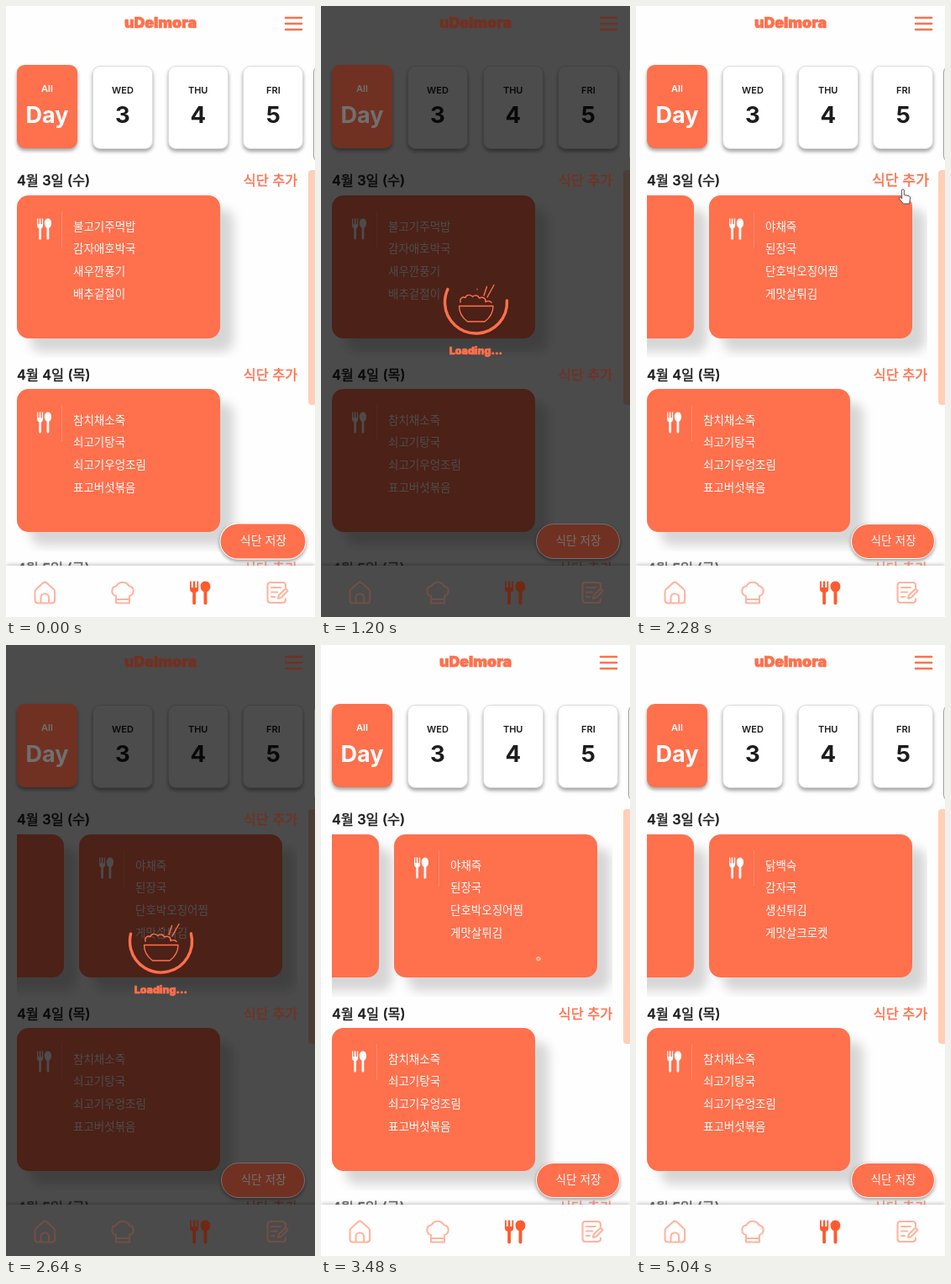
An HTML page that plays this animation: 368x726 px, repeating every 5160 ms.

```html
<!DOCTYPE html>
<html lang="ko">
<head>
<meta charset="utf-8">
<title>식단</title>
<style>
html, body { margin: 0; width: 100%; height: 100%; overflow: hidden; background: #fff; }
#stage { position: relative; width: 368px; height: 726px; overflow: hidden; background: #fefefe;
  font-family: Inter, "Noto Sans CJK KR", "Noto Sans CJK", sans-serif; color: #1c1c1c; }
#stage div, #stage svg { position: absolute; box-sizing: border-box; }
#stage svg { left: 0; top: 0; overflow: visible; }
.txt { white-space: pre; line-height: 1; transform: translateY(-50%); }
.mid { transform: translate(-50%, -50%); }
.hot { z-index: 6; }
.medium { -webkit-text-stroke: .4px; }
.heavy { -webkit-text-stroke: .7px; }
.day { width: 72px; height: 99px; border-radius: 9px; background: #fff; border: 1px solid #dcdcdc;
  box-shadow: 0 3px 4px rgba(0,0,0,.36); }
.day.on { background: #ff704d; border: 0; color: #fff; }
.row { left: 13px; width: 334px; height: 193px; overflow: hidden; }
.card { top: 0; width: 242px; height: 170px; border-radius: 14px; background: #ff704d; color: #fff;
  box-shadow: 16px 16px 13px rgba(0,0,0,.16); }
.rule { left: 52.5px; top: 19px; width: 1.5px; height: 43px; background: #ff8e70; }
.add { color: #ff704d; }
#bar { left: 360px; top: 195px; width: 12px; height: 279px; border-radius: 4px; background: #ffcfb8; }
#nav { left: 0; top: 665px; width: 368px; height: 61px; background: #fefefe; z-index: 3;
  box-shadow: 0 -1px 5px rgba(0,0,0,.25); }
#save { left: 256px; top: 615px; width: 100px; height: 42px; border-radius: 21px; background: #ff704d;
  border: 1px solid #fff; box-shadow: 0 2px 4px rgba(0,0,0,.4); color: #fff; }
#dark { inset: 0; background: #000; z-index: 5; }
#loader { inset: 0; z-index: 8; }
#cursors { z-index: 7; }
</style>
</head>
<body>
<div id="stage"></div>
<script>
const LOOP = 5160, ORANGE = '#ff704d', PALE = '#ffb49e';
const stage = document.getElementById('stage');

function box(parent, cls, style = {}, id = '') {
  const el = document.createElement('div');
  el.className = cls;
  if (id) el.id = id;
  Object.assign(el.style, style);
  return parent.appendChild(el);
}

function text(parent, str, x, y, size, weight = 400, cls = '') {
  const el = box(parent, 'txt ' + cls, { left: x + 'px', top: y + 'px', fontSize: size + 'px', fontWeight: weight });
  el.textContent = str;
  return el;
}

function svg(parent, markup, cls = '', id = '') {
  parent.insertAdjacentHTML('beforeend',
    `<svg class="${cls}" id="${id}" width="368" height="726" fill="none" stroke-linecap="round" stroke-linejoin="round">${markup}</svg>`);
  return parent.lastElementChild;
}

const cutlery = (x, y, sx, sy, fill) => `<path transform="translate(${x} ${y}) scale(${sx} ${sy})" fill="${fill}"
  d="M0 0h1.3v7h1.5v-7h1.7v7h1.5v-7h1.3v8.5q0 3.2-2.3 3.8v12q0 1.5-1.35 1.5t-1.35-1.5v-12q-2.3-.6-2.3-3.8z
  M13.2 0c2.7 0 4.2 2.8 4.2 5.7 0 3-1.2 5-2.8 5.8v12.8q0 1.5-1.4 1.5t-1.4-1.5v-12.8c-1.6-.8-2.8-2.8-2.8-5.8 0-2.9 1.5-5.7 4.2-5.7z"/>`;

function card(row, i, meals) {
  const el = box(row, 'card', { left: i * 260 + 'px' });
  svg(el, cutlery(24, 27.5, .98, .98, '#fff'));
  box(el, 'rule');
  meals.split(' ').forEach((m, k) => text(el, m, 67, 37.5 + k * 26.9, 13.5));
  return el;
}

// header
text(stage, 'uDelmora', 184, 19.5, 17.8, 900, 'mid hot add heavy');
svg(stage, `<path d="M333 14h19M333 21h19M333 28h19" stroke="${ORANGE}" stroke-width="2.6"/>`, 'hot');

// day picker
const all = box(stage, 'day on hot', { left: '13px', top: '70px' });
text(all, 'All', 36, 28, 11, 600, 'mid');
text(all, 'Day', 36, 58.5, 27, 700, 'mid');
['WED 3', 'THU 4', 'FRI 5'].forEach((d, i) => {
  const el = box(stage, 'day', { left: 103 + i * 89.7 + 'px', top: '71px' });
  const [name, num] = d.split(' ');
  text(el, name, 35, 28, 11, 600, 'mid');
  text(el, num, 35, 58, 27.5, 700, 'mid');
});
box(stage, 'day hot', { left: '365.5px', top: '70px', height: '117px', borderColor: '#999', boxShadow: 'none' });
box(stage, '', {}, 'bar');

// meal rows
const adds = ['3일 (수)', '4일 (목)', '5일 (금)'].map((d, i) => {
  const y = 207 + i * 230.5, last = i === 2;
  const title = text(stage, '4월 ' + d, 13, y, 16.4, 500, 'medium');
  const add = text(stage, '식단 추가', 315, y, 16.3, 500, 'mid add medium' + (last ? '' : ' hot'));
  if (last) title.style.opacity = add.style.opacity = .65;
  return add;
});
const row1 = box(stage, 'row', { top: '225px' });
const row2 = box(stage, 'row', { top: '455px' });
const cards = ['불고기주먹밥 감자애호박국 새우깐풍기 배추겉절이', '야채죽 된장국 단호박오징어찜 게맛살튀김',
  '닭백숙 감자국 생선튀김 게맛살크로켓'].map((m, i) => card(row1, i, m));
card(row2, 0, '참치채소죽 쇠고기탕국 쇠고기우엉조림 표고버섯볶음');

// bottom bar
box(stage, '', {}, 'nav');
svg(stage, `<g stroke="${PALE}" stroke-width="2.1">
  <path d="M34.5 696q0-2 1.6-3.3l8-7.2q2.2-1.9 4.4 0l8 7.2q1.6 1.3 1.6 3.3v10q0 3.5-3.5 3.5h-16.6q-3.5 0-3.5-3.5z
    M41.5 709v-6a4.8 4.8 0 0 1 9.6 0v6"/>
  <path d="M131 709.5v-8.5a6 6 0 0 1 .5-11.8a8.5 8.5 0 0 1 15 0a6 6 0 0 1 .5 11.8v8.5zM131 705h16"/>
  <path d="M333 691v-2.5q0-3.5-3.5-3.5h-14.5q-3.5 0-3.5 3.5v17q0 3.5 3.5 3.5h14.5q3.5 0 3.5-3.5v-1
    M316 691h11M316 696.5h7M316 702h4M324 704l1-4 8-7.5 2.5 2.5-7.8 8z"/></g>
  ${cutlery(219, 683.5, 1.4, 1.08, '#ff5a30')}`, 'hot');
const save = box(stage, 'hot', {}, 'save');
text(save, '식단 저장', 49.5, 20, 13.6, 400, 'mid');

// overlays
const dark = box(stage, '', {}, 'dark');
svg(stage, `<g id="hand"><path transform="translate(313 217)" fill="#fff" stroke="#555" stroke-width="1"
  d="M3.5 1.5q1.5-1.5 2.8 0v6l5.7 1.2q1.8.6 1.6 2.4l-1 6.9h-7.2l-4.8-6q-.6-1.7 1-1.8l1.9 1.4z"/></g>
  <circle id="dot" cy="373" r="2.2" fill="#ff8a6a" stroke="#ffe3da" stroke-width=".9"/>`, '', 'cursors');
const hand = document.getElementById('hand'), dot = document.getElementById('dot');
const loader = box(stage, '', {}, 'loader');
svg(loader, `<g stroke="${ORANGE}" stroke-width="1.4">
  <circle id="arc" cx="184.5" cy="352" r="37" stroke-width="3.4" stroke-dasharray="134 98.5"/>
  <path d="M164.5 356.5h40.5c0 8-4 14-10 18.5h-20.5c-6-4.5-10-10.5-10-18.5z
    M166 352c-1-5 3-7 6-5.5 1-4 7-4 8.5-1 3-3 7-1.5 8 1.5 4-2 8 0 7.5 4.5 3-1.5 6-1 7 1
    M194 344l3.5-10.5M198 346l8-14.5M186 336.5v.2"/></g>`);
text(loader, 'Loading...', 184.5, 409.5, 12.3, 900, 'mid add heavy');
const arc = document.getElementById('arc');

const clamp = v => Math.max(0, Math.min(1, v));
const span = (t, a, b) => clamp((t - a) / (b - a));
const glide = u => (1 - Math.cos(Math.PI * u)) / 2;

// each load: dim from, white flash from, arc angle at both
const loads = [
  { dim: 790, flash: 1205, dimArc: -151, flashArc: -160 },
  { dim: 2330, flash: 2688, dimArc: -126, flashArc: -180 }
];
const FADE = 355;
const hots = stage.querySelectorAll('.hot');

function render(t) {
  let shade = 0, white = 0, angle = 0;
  for (const l of loads) {
    if (t >= l.dim && t < l.flash) {
      shade = span(t, l.dim, l.dim + 110);
      angle = l.dimArc + (t - l.dim) * .36;
    } else if (t >= l.flash && t < l.flash + FADE) {
      white = 1 - span(t, l.flash, l.flash + FADE);
      angle = l.flashArc + (t - l.flash) * .36;
    }
  }
  dark.style.opacity = shade * .7;
  loader.style.opacity = shade || white;
  loader.style.background = white ? '#fff' : 'none';
  arc.setAttribute('transform', `rotate(${angle} 184.5 352)`);
  for (const el of hots) el.style.filter = shade ? `brightness(${1 - shade * .56})` : 'none';

  const count = 1 + loads.filter(l => t >= l.flash).length;
  const scroll = 186 * glide(span(t, 1680, 2100)) + 260 * glide(span(t, 3480, 4173));
  cards.forEach((c, i) => {
    c.style.display = i < count ? '' : 'none';
    c.style.transform = `translateX(${-scroll}px)`;
  });

  const hover = t >= 2160 && t < 2400;
  adds[0].style.display = count < 3 ? '' : 'none';
  adds[0].style.transform = `translate(-50%, -50%) scale(${hover ? 1.06 : 1})`;
  save.style.transform = `scale(${t < 840 ? 1.03 : 1})`;
  hand.style.display = hover ? '' : 'none';
  dot.style.display = t >= 3480 && t < 4020 ? '' : 'none';
  dot.setAttribute('cx', 445 - scroll);
}

const start = performance.now();
function tick() {
  render((performance.now() - start) % LOOP);
  requestAnimationFrame(tick);
}
render(0);
tick();
</script>
</body>
</html>
```
